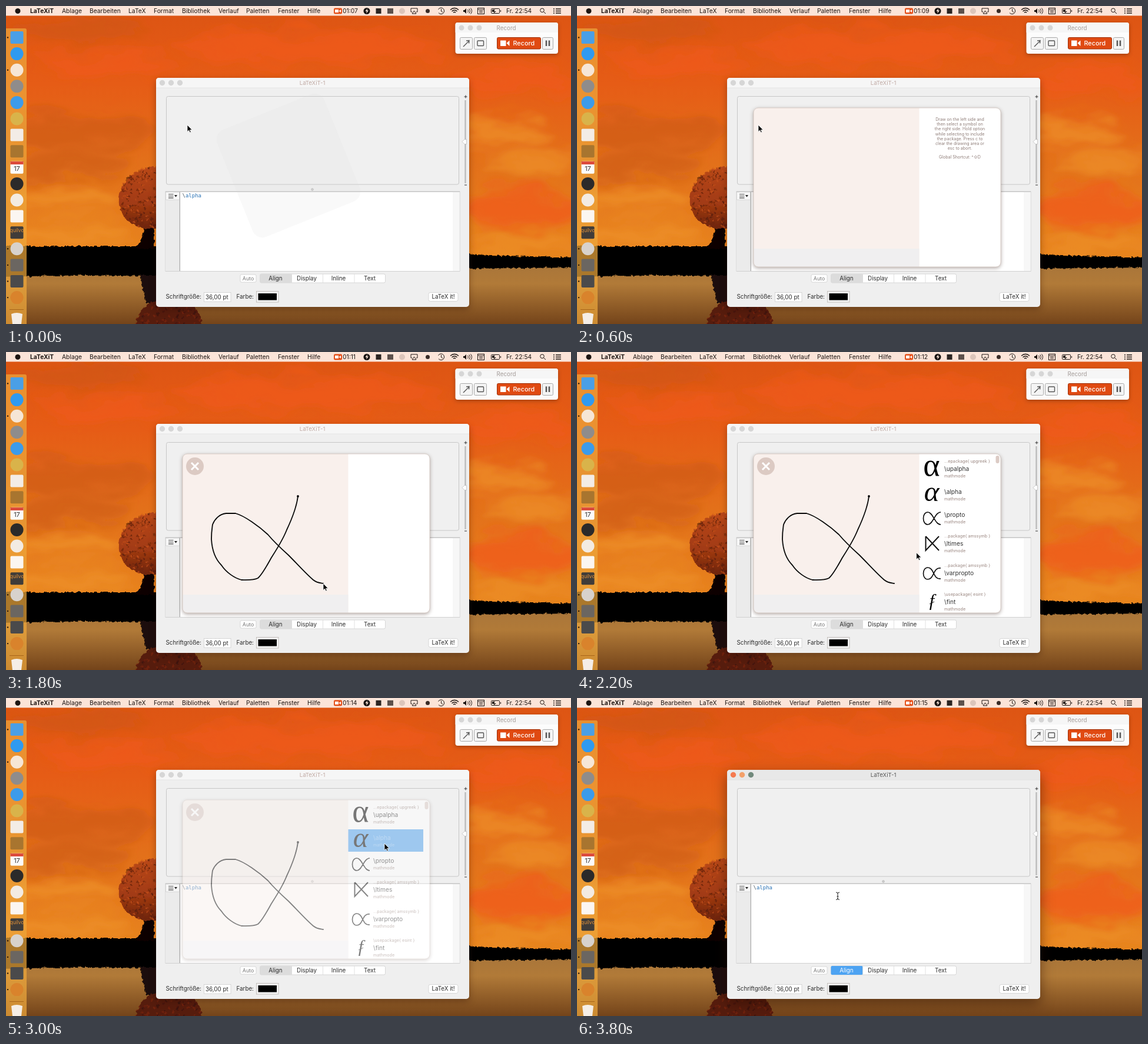
An HTML page that plays this animation: 960x540 px, repeating every 4 s.

```html
<!DOCTYPE html>
<html lang="de">
<head>
<meta charset="utf-8">
<title>Symbol palette</title>
<style>
html, body { margin: 0; width: 100%; height: 100%; overflow: hidden; background: #e2600f; }
svg { display: block; width: 960px; height: 540px; font-family: Inter, Roboto, "Noto Sans", sans-serif; }
.mid { text-anchor: middle; }
.menu { font-size: 10.3px; fill: #1d1512; }
.ui { font-size: 9.8px; fill: #2b2b2b; }
.ctl { fill: #fff; stroke: #cfcfcf; stroke-width: .8; }
.lights { fill: #d6d6d6; }
.bar { fill: #f6f6f6; }
.title { fill: #c0aaa4; font-size: 9.6px; }
.seg { fill: #dcdcdc; }
.active .bar { fill: #e8e8e8; }
.active .title { fill: #555; }
.active .seg { fill: #4da3f2; }
.active .align { fill: #fff; }
.active .r { fill: #f47a50; }
.active .y { fill: #f3a06a; }
.active .g { fill: #71897c; }
#win { filter: drop-shadow(0 4px 6px rgba(40, 10, 0, .35)); }
#win.active { filter: drop-shadow(0 8px 11px rgba(40, 10, 0, .5)); }
#palette, #record { filter: drop-shadow(0 2px 3px rgba(40, 15, 5, .35)); }
.hint { font-size: 7px; fill: #8d7b76; }
.small { font-size: 7.2px; fill: #98847e; }
.name { font-size: 10.2px; fill: #333; }
.greek { font-family: "Liberation Serif", "Noto Serif", serif; }
.line { fill: none; stroke: #111; stroke-width: 1.7; }
.picked .name, .picked .small { fill: #8fc4f6; }
.code { font: 9px "DejaVu Sans Mono", "Liberation Mono", monospace; fill: #2670b4; }
</style>
</head>
<body>
<svg viewBox="0 0 960 540">
  <defs>
    <linearGradient id="sky" x1="0" y1="0" x2="0" y2="1">
      <stop offset="0" stop-color="#dc5413"/>
      <stop offset=".3" stop-color="#e65c16"/>
      <stop offset=".6" stop-color="#e3701a"/>
      <stop offset="1" stop-color="#e8861e"/>
    </linearGradient>
    <linearGradient id="water" x1="0" y1="0" x2="0" y2="1">
      <stop offset="0" stop-color="#a8753a"/>
      <stop offset=".35" stop-color="#b17a38"/>
      <stop offset="1" stop-color="#74441a"/>
    </linearGradient>
    <linearGradient id="crown" x1="0" y1="0" x2="0" y2="1">
      <stop offset="0" stop-color="#b9481a"/>
      <stop offset=".6" stop-color="#a13a12"/>
      <stop offset="1" stop-color="#6d240b"/>
    </linearGradient>
    <filter id="cloud" x="-30%" y="-60%" width="160%" height="220%">
      <feGaussianBlur stdDeviation="10" result="b"/>
      <feTurbulence type="fractalNoise" baseFrequency=".012 .025" numOctaves="3" seed="4"/>
      <feDisplacementMap in="b" scale="60" xChannelSelector="R" yChannelSelector="G"/>
    </filter>
    <filter id="ragged" x="-10%" y="-10%" width="120%" height="120%">
      <feTurbulence type="fractalNoise" baseFrequency=".2" numOctaves="2" seed="2"/>
      <feDisplacementMap in="SourceGraphic" scale="6" xChannelSelector="R" yChannelSelector="G"/>
    </filter>
    <filter id="keyShadow"><feDropShadow dx="0" dy="2" stdDeviation="2" flood-opacity=".7"/></filter>
    <clipPath id="sheet"><rect x="300" y="173" width="420" height="270" rx="8"/></clipPath>
  </defs>

  <!-- landscape -->
  <rect width="960" height="440" fill="url(#sky)"/>
  <g filter="url(#cloud)">
    <g fill="#c9581a" opacity=".55">
      <ellipse cx="120" cy="40" rx="120" ry="14"/>
      <ellipse cx="120" cy="215" rx="130" ry="30"/>
      <ellipse cx="100" cy="270" rx="110" ry="20"/>
    </g>
    <g fill="#f05a1c" opacity=".75">
      <ellipse cx="170" cy="95" rx="120" ry="20"/>
      <ellipse cx="520" cy="70" rx="220" ry="28"/>
      <ellipse cx="870" cy="125" rx="110" ry="22"/>
      <ellipse cx="880" cy="345" rx="100" ry="34"/>
    </g>
    <g fill="#ee9026" opacity=".75">
      <ellipse cx="105" cy="330" rx="100" ry="18"/>
      <ellipse cx="100" cy="385" rx="120" ry="20"/>
      <ellipse cx="840" cy="215" rx="90" ry="20"/>
      <ellipse cx="900" cy="268" rx="75" ry="20"/>
      <ellipse cx="880" cy="405" rx="90" ry="13"/>
    </g>
  </g>
  <rect y="435" width="960" height="105" fill="url(#water)"/>
  <g filter="url(#ragged)">
    <path d="M-10 408H260V459L130 457-10 460Z" fill="#060403"/>
    <path d="M770 421L850 424 975 427V444L770 446Z" fill="#060403"/>
    <path d="M232 365H252V412H218Q232 400 234 380Z" fill="#0a0504"/>
    <path d="M192 336C189 305 215 277 250 273H310V378H246C222 379 197 366 192 336Z" fill="url(#crown)"/>
    <path d="M228 457H262V505H238Z" fill="#1c0f08"/>
    <path d="M220 545C223 515 244 498 278 495C310 496 331 512 334 545Z" fill="#571a0b"/>
    <g id="leaves"></g>
  </g>

  <!-- menu bar -->
  <rect width="960" height="16.5" fill="#fbe4d8"/>
  <g id="menus" class="menu"><circle cx="20" cy="8.5" r="4.5"/></g>
  <g id="status">
    <rect x="557" y="3.5" width="14" height="10" rx="2" fill="#e5511a"/>
    <path d="M559 6H565V11H559ZM565.5 8.5L569 6V11Z" fill="#fff"/>
    <text id="clock" class="menu" x="572" y="12"></text>
    <circle cx="613" cy="8.5" r="5.5" fill="#17110f"/>
    <path d="M614 4L610.5 9H613L612 13L616 7.5H613.5Z" fill="#fbe4d8"/>
    <rect x="628.5" y="4" width="9" height="9" fill="#2c2522"/>
    <rect x="648" y="4" width="10" height="9" fill="#5d514c"/>
    <circle cx="673" cy="8.5" r="5" fill="#dcc5ba"/>
    <path d="M690 10H688V4H699V10H697M693.5 8L697 13H690Z" fill="none" stroke="#1d1512"/>
    <circle cx="716.5" cy="8.5" r="3.5" fill="#3a2c27"/>
    <g fill="none" stroke="#1d1512">
      <path d="M734.5 6A5.3 5.3 0 1 1 735 11.5M739.5 5V9L742 10.5"/>
      <path d="M755 6.5Q762 .5 769 6.5M757.5 9Q762 5 766.5 9M760 11.2Q762 9.5 764 11.2" stroke-width="1.4"/>
      <path d="M784.5 6Q786.5 8.5 784.5 11M787 4.5Q790 8.5 787 12.5M789.5 3.5Q793.5 8.5 789.5 13.5"/>
      <rect x="801.5" y="3.5" width="11" height="10"/>
      <path d="M801.5 6H812.5M804 8.5H810M804 11H810"/>
      <rect x="824.5" y="4.5" width="14" height="8" rx="1"/>
      <circle cx="911" cy="7.3" r="3.3"/><path d="M913.5 9.8L917 13"/>
      <path d="M930 5H932M934 5H943M930 8.5H932M934 8.5H943M930 12H932M934 12H943" stroke-width="1.3"/>
    </g>
    <path d="M777 7H779L782 4V13L779 10H777ZM826 6H831L829 9H833L829 12V10H826ZM840 7H841V10H840Z" fill="#1d1512"/>
    <text class="menu" x="850" y="12">Fr. 22:54</text>
  </g>

  <!-- dock -->
  <path d="M0 38H32Q35 38 35 41V540H0Z" fill="#eda73c" opacity=".72"/>
  <g id="dock"></g>
  <path d="M6 515.5H30" stroke="#a9661a"/>

  <!-- recorder -->
  <g id="record">
    <rect x="763.5" y="28" width="174.500" height="53" rx="4" fill="#fcfcfc"/>
    <path class="bar" d="M763.5 45V32Q763.5 28 767.5 28H934Q938 28 938 32V45Z"/>
    <g class="lights"><circle cx="774" cy="37" r="4.5"/><circle cx="789" cy="37" r="4.5"/><circle cx="804" cy="37" r="4.5"/></g>
    <text class="ui mid" x="850" y="40.5" style="fill:#a49c99">Record</text>
    <g fill="#f4f4f4" stroke="#a9a9a9">
      <rect x="771.5" y="53.5" width="21" height="20" rx="2"/>
      <rect x="795.5" y="53.5" width="21" height="20" rx="2"/>
      <rect x="911.5" y="53.5" width="18" height="20" rx="2"/>
    </g>
    <path d="M777 69L786 60M782 59L787 58.5 786.5 63.5" fill="none" stroke="#555" stroke-width="1.4"/>
    <rect x="801" y="59" width="10.5" height="8.5" rx="1" fill="none" stroke="#555" stroke-width="1.4"/>
    <path d="M918 58.5V68M923 58.5V68" stroke="#555" stroke-width="2.5"/>
    <rect x="834.5" y="53.5" width="74" height="19.5" rx="2" fill="#e04a12" stroke="#9d2f08"/>
    <path d="M840 58.5H849.5V68H840ZM850.5 63L855.5 58.5V68Z" fill="#fff"/>
    <text x="861.5" y="67.2" font-size="10.8" font-weight="500" fill="#fff">Record</text>
  </g>

  <!-- main window -->
  <g id="win">
    <rect x="255" y="122" width="532" height="389" rx="5" fill="#efefef"/>
    <path class="bar" d="M255 139V127Q255 122 260 122H782Q787 122 787 127V139Z"/>
    <path d="M255 139H787" stroke="#e0e0e0" stroke-width=".8"/>
    <g class="lights"><circle class="r" cx="265.5" cy="130.5" r="4.7"/><circle class="y" cx="280.5" cy="130.5" r="4.7"/><circle class="g" cx="295.5" cy="130.5" r="4.7"/></g>
    <text class="title mid" x="520.5" y="134.3">LaTeXiT-1</text>
    <rect x="272.5" y="153.5" width="497" height="149.5" rx="3" fill="#f0f0f0" stroke="#c6c6c6"/>
    <path d="M778.5 154H783.5M781 151.5V156.5M779 304H783" stroke="#333"/>
    <path d="M780.5 160V301" stroke="#bcbcbc" stroke-width="2.4"/>
    <path d="M775 230.5L779 226.5H782.5V234.5H779Z" fill="#fff" stroke="#b5b5b5" stroke-width=".7"/>
    <circle cx="520.5" cy="311.5" r="1.8" fill="#d2d2d2" stroke="#aaa" stroke-width=".7"/>
    <rect x="271" y="315" width="500" height="135.5" fill="#fff" stroke="#c9c9c9" stroke-width=".8"/>
    <rect x="271.5" y="315.5" width="24" height="134.5" fill="#ebebeb"/>
    <rect x="759" y="315.5" width="11.5" height="134.5" fill="#f7f7f7"/>
    <path d="M295.3 315V450" stroke="#9a9a9a"/>
    <path d="M271 315.3H771" stroke="#bdbdbd"/>
    <rect x="271.5" y="316" width="23" height="13" fill="#f8f8f8" stroke="#cacaca" stroke-width=".7"/>
    <path d="M276 319.5H284.5M276 322H284.5M276 324.5H284.5M276 326.5H284.5" stroke="#555" stroke-width=".9"/>
    <path d="M286 321H291L288.5 324.5Z" fill="#222"/>
    <text class="code" x="299.5" y="325"><tspan fill="#44545f">\</tspan>alpha</text>
    <path id="caret" d="M332 316V327" stroke="#222" stroke-width=".8"/>
    <rect class="ctl" x="398" y="456" width="27" height="13" rx="2"/>
    <text class="ui mid" x="411.5" y="466" style="font-size:8.8px;fill:#777">Auto</text>
    <rect class="ctl" x="431.5" y="455" width="213" height="15" rx="2.5"/>
    <rect class="seg" x="431.5" y="455" width="54" height="15" rx="2"/>
    <path d="M485.5 455V470M538.5 455V470M592 455V470" stroke="#d9d9d9" stroke-width=".8"/>
    <g class="ui mid">
      <text class="align" x="458" y="466">Align</text><text x="511" y="466">Display</text>
      <text x="565" y="466">Inline</text><text x="618" y="466">Text</text>
    </g>
    <text class="ui" x="271.5" y="497.2">Schriftgröße:</text>
    <rect class="ctl" x="336.5" y="486.5" width="45.5" height="15.5"/>
    <text class="ui" x="339" y="498">36,00 pt</text>
    <text class="ui" x="391.5" y="497.2">Farbe:</text>
    <rect class="ctl" x="425.5" y="484.5" width="37.5" height="18.5" style="fill:#f3f3f3;stroke:#b9b3b0"/>
    <rect x="428.5" y="488" width="31.5" height="11.5"/>
    <rect class="ctl" x="718" y="486.5" width="50" height="15" rx="3"/>
    <text class="ui mid" x="743" y="497.2">LaTeX it!</text>
  </g>
  <rect id="mark" x="-98" y="-98" width="196" height="196" rx="18" transform="translate(480 271) rotate(-22)" fill="#d8d8d8" opacity=".16"/>

  <!-- drawing palette -->
  <g id="palette">
    <rect x="300" y="173" width="420" height="270" rx="8" fill="#fff"/>
    <g clip-path="url(#sheet)">
      <rect x="300" y="173" width="281.5" height="270" fill="#f9f0ec"/>
      <rect x="300" y="412" width="281.5" height="31" fill="#f0eff0"/>
      <g id="list">
        <rect id="choice" x="581.5" y="223" width="127.5" height="38" fill="#4ea2ef"/>
        <text class="greek mid" x="602.5" y="209.5" font-size="54">α</text>
        <text class="greek mid" x="602.5" y="253" font-size="49" font-style="italic">α</text>
        <path class="line" d="M618 272C608 272 605 293 596 293C586 293 586 272 596 272C605 272 608 293 618 293"/>
        <path class="line" d="M592.5 313V337L615 313M592.5 313L615 337" style="stroke-width:2"/>
        <path class="line" d="M618 367C605 365 607 386 596 386C586 386 586 366 596 366C607 366 605 387 618 385"/>
        <text class="greek mid" x="603" y="432" font-size="30" font-style="italic">f</text>
        <path class="line" d="M599 428L607 424" style="stroke-width:1"/>
        <rect x="711.5" y="176" width="6" height="13" rx="3" fill="#dccbc5"/>
      </g>
    </g>
    <rect x="300" y="173" width="420" height="270" rx="8" fill="none" stroke="#d2c4bd" stroke-width=".8"/>
    <g id="hint" class="hint mid"></g>
    <g id="close">
      <circle cx="321" cy="194" r="15" fill="#dccac3"/>
      <path d="M315 188L327 200M327 188L315 200" stroke="#fff" stroke-width="3"/>
    </g>
    <g id="ink" fill="none" stroke="#080808" stroke-width="1.8" stroke-linecap="round">
      <circle cx="496" cy="245" r="1" fill="#080808"/>
      <path id="stroke" pathLength="1" stroke-dasharray="1 1.1" d="M496 245C494 262 485 285 477 302C470 320 458 338 451 349C445 360 435 378 428 384C420 388 408 387 400 387C388 384 374 374 366 362C354 350 350 335 349 318C349 305 350 300 351 293C354 285 362 275 374 274H390C405 278 430 296 445 310C455 322 470 336 480 345C495 360 510 377 522 387C528 392 533 392 539 393"/>
    </g>
  </g>

  <!-- pressed keys -->
  <g id="keys">
    <path d="M0 412H940Q948 412 948 420V517Q948 525 940 525H0Z" fill="#321914" opacity=".34"/>
    <g filter="url(#keyShadow)">
      <path d="M435 454L461 479 453 487 435 470 417 487 409 479Z" fill="#fff"/>
      <path d="M515 454.5L547 485.5H532.5V506H498V485.5H483Z" fill="none" stroke="#fff" stroke-width="5.5"/>
    </g>
  </g>

  <!-- pointers -->
  <circle id="ring" cx="644" cy="248" r="16.5" fill="#fff" fill-opacity=".12" stroke="#2e4a63" stroke-width="1.3"/>
  <path id="arrow" d="M0 0V11.5L2.7 9 4.5 13 6.4 12.2 4.6 8.4H8.2Z" fill="#000" stroke="#fff" stroke-width=".8"/>
  <path id="beam" d="M-3-6Q0-6 0-4Q0-6 3-6M0-4V5M-3 6.5Q0 6.5 0 4.5Q0 6.5 3 6.5M-1.5 1H1.5" fill="none" stroke="#222"/>
</svg>
<script>
const LOOP = 4000, STEP = 200;
const $ = id => document.getElementById(id);
const show = (id, on) => { $(id).style.display = on ? "" : "none"; };

function add(parent, tag, attrs, text) {
  const el = document.createElementNS("http://www.w3.org/2000/svg", tag);
  for (const key in attrs) el.setAttribute(key, attrs[key]);
  if (text) el.textContent = text;
  return $(parent).appendChild(el);
}

let seed = 7;
const random = () => (seed = seed * 16807 % 2147483647) / 2147483647;

// Leaves scattered over an elliptical crown.
function scatter(count, cx, cy, rx, ry, fills) {
  for (let i = 0; i < count; i++) {
    const angle = random() * Math.PI * 2, reach = Math.sqrt(random());
    add("leaves", "circle", {
      cx: cx + rx * reach * Math.cos(angle), cy: cy + ry * reach * Math.sin(angle),
      r: 1 + random() * 1.2, fill: fills[i % fills.length], opacity: .6
    });
  }
}
scatter(260, 246, 326, 54, 52, ["#6a250c", "#c9541c", "#4e1a09"]);
scatter(140, 277, 542, 57, 46, ["#30110a", "#7d2a10"]);

[["LaTeXiT", 41], ["Ablage", 95], ["Bearbeiten", 142], ["LaTeX", 208], ["Format", 251], ["Bibliothek", 299],
 ["Verlauf", 361], ["Paletten", 408], ["Fenster", 462], ["Hilfe", 512]]
  .forEach(([label, x], i) => add("menus", "text", { x, y: 12, "font-weight": i ? 400 : 700 }, label));

// Dock tiles from top to bottom: o = round, s = square.
"s:#4a9fe6 o:#2f9af0 o:#f6e6d6 o:#8f8c8b o:#3c9bea o:#d9b34a s:#f3ece6 s:#a8752f s:#fbfafa o:#2b2a2a o:#f3ebe2 s:#fbf6f1 s:#403c39 o:#d8d2cc s:#6b6661 s:#4a4a4b o:#d9832c"
  .split(" ").forEach((tile, i) => {
    const [shape, fill] = tile.split(":"), y = 53.5 + i * 27.6;
    if (shape === "o") add("dock", "circle", { cx: 18.5, cy: y, r: 11, fill });
    else add("dock", "rect", { x: 7.5, y: y - 10.5, width: 22, height: 21, rx: 2, fill });
    if ([0, 2, 13, 14, 15, 16].includes(i)) add("dock", "circle", { cx: 3, cy: y, r: 1.2, fill: "#2a1608" });
  });
add("dock", "rect", { x: 7.5, y: 264, width: 22, height: 5, fill: "#dc4a3c" });
add("dock", "text", { x: 18.5, y: 280, "font-size": 11, class: "mid", fill: "#333" }, "17");
add("dock", "text", { x: 18.5, y: 384, "font-size": 8.5, class: "mid", fill: "#e29238" }, "quilvo");
add("dock", "path", { d: "M9 523Q18 519 28 523L26 540H11Z", fill: "#f5eee6" });

["Draw on the left side and", "then select a symbol on", "the right side. Hold option", "while selecting to include",
 "the package. Press c to", "clear the drawing area or", "esc to abort."]
  .forEach((line, i) => add("hint", "text", { x: 650.5, y: 194.8 + i * 8.25 }, line));
add("hint", "text", { x: 650.5, y: 258.8 }, "Global Shortcut: ^⇧D");

[[198, "\\upalpha", "...epackage{ upgreek }"], [237, "\\alpha"], [276, "\\propto"],
 [325.5, "\\ltimes", "...package{ amssymb }"], [375, "\\varpropto", "...package{ amssymb }"],
 [424.5, "\\fint", "\\usepackage{ esint }"]]
  .forEach(([y, name, pack], i) => {
    const id = "row" + i, x = 624;
    add("list", "g", { id });
    if (pack) add(id, "text", { x, y: y - 10.5, class: "small" }, pack);
    add(id, "text", { x, y: y + 3.5, class: "name" }, name);
    add(id, "text", { x, y: y + 14.7, class: "small" }, "mathmode");
  });

const stroke = $("stroke"), strokeLength = stroke.getTotalLength();

// Pointer stops outside the drawing phase: time, x, y.
const stops = [[0, 308, 202], [600, 308, 202], [1000, 496, 245], [1800, 539, 393], [2000, 545, 384],
  [2600, 640, 254], [2800, 643, 247], [3000, 643, 247], [3400, 458, 341], [3800, 443, 336], [4000, 443, 336]];

function pointer(t) {
  if (t >= 1000 && t <= 1800) return stroke.getPointAtLength(strokeLength * (t - 1000) / 800);
  const i = stops.findIndex(s => s[0] > t), [t0, x0, y0] = stops[i - 1], [t1, x1, y1] = stops[i];
  const k = (t - t0) / (t1 - t0);
  return { x: x0 + (x1 - x0) * k, y: y0 + (y1 - y0) * k };
}

function draw(t) {
  const { x, y } = pointer(t), active = t >= 3200, picked = t >= 2800;
  $("clock").textContent = "01:" + String(Math.floor(7.77 + t * .00215)).padStart(2, "0");
  $("win").classList.toggle("active", active);
  show("mark", t < 200);
  show("keys", t >= 200 && t < 600);
  show("palette", t >= 400 && !active);
  $("palette").style.opacity = t >= 3000 ? .5 : 1;
  show("hint", t < 1000);
  show("close", t >= 800);
  show("ink", t >= 1000);
  stroke.style.strokeDashoffset = 1 - Math.min(1, Math.max(0, (t - 1000) / 800));
  show("list", t >= 2000);
  show("choice", picked);
  $("row1").classList.toggle("picked", picked);
  show("ring", t === 2800);
  show("caret", t >= 3200 && t < 3600);
  show("arrow", t < 3400);
  show("beam", t >= 3400);
  for (const id of ["arrow", "beam"]) $(id).setAttribute("transform", `translate(${x} ${y})`);
}

let last = -1;
const start = performance.now();
function tick(now) {
  const t = Math.floor(Math.max(0, now - start) % LOOP / STEP) * STEP;
  if (t !== last) draw(last = t);
  requestAnimationFrame(tick);
}
draw(0);
requestAnimationFrame(tick);
</script>
</body>
</html>
```
